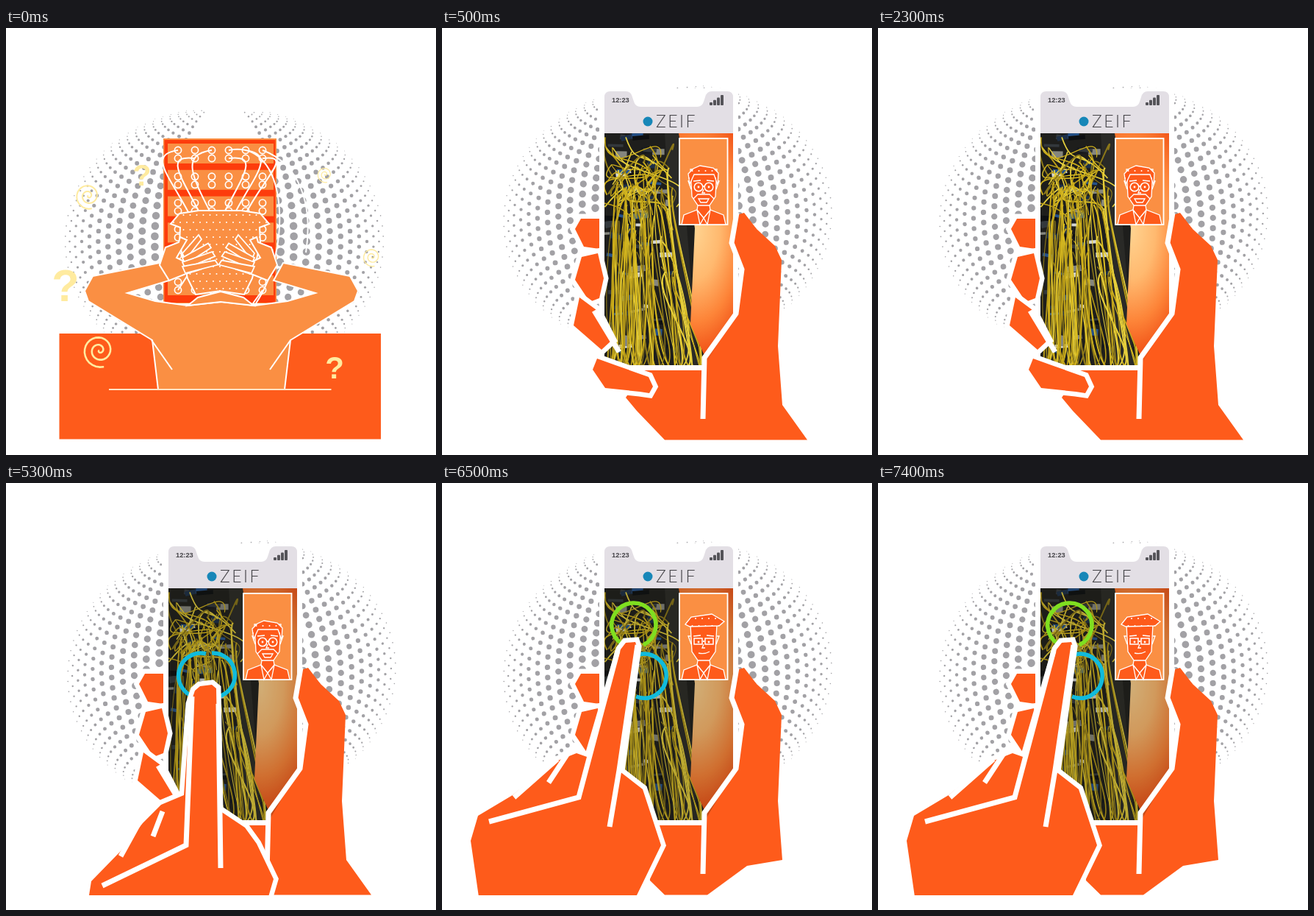
An HTML page for the animation above (8 s loop, 585 by 580 pixels).

```html
<!DOCTYPE html>
<html lang="en">
<head>
<meta charset="utf-8">
<title>Remote support</title>
<style>
  html, body { margin: 0; width: 100%; height: 100%; overflow: hidden; background: #fff }
  svg { display: block; width: 585px; height: 580px }
</style>
</head>
<body>
<svg id="stage" viewBox="0 0 585 580"></svg>
<script>
const ORANGE = '#fe5b1b', SKIN = '#fa8f43', RED = '#fd3c0c', CREAM = '#ffeb9f', CYAN = '#10bbdc', GREEN = '#7fdf20';
const LOOP = 8000, CUTS = [500, 3500, 6500];

const range = n => [...Array(n).keys()];
const repeat = (n, draw) => range(n).map(draw).join('');
const poly = (points, fill, width = 0, extra = '') =>
  `<polygon points="${points}" fill="${fill}" stroke="#fff" stroke-width="${width}" ${extra}/>`;
const line = (d, width, color = '#fff') =>
  `<path d="${d}" fill="none" stroke="${color}" stroke-width="${width}"/>`;
const rect = (x, y, w, h, fill, extra = '') =>
  `<rect x="${x}" y="${y}" width="${w}" height="${h}" fill="${fill}" ${extra}/>`;
const circle = (x, y, r, extra = '') => `<circle cx="${x}" cy="${y}" r="${r}" ${extra}/>`;
const scene = (ids, body) => `<g data-scenes="${ids}">${body}</g>`;
const limb = points => poly(points, ORANGE, 13, 'paint-order="stroke" clip-path="url(#floor)"');

// Mirror a drawing, or complete half an outline, about x = sum / 2.
const mirror = (body, sum) => body + `<g transform="matrix(-1 0 0 1 ${sum} 0)">${body}</g>`;
function symmetric(half, sum) {
  const points = half.split(' ').map(p => p.split(',').map(Number));
  return [...points, ...points.map(([x, y]) => [sum - x, y]).reverse()].join(' ');
}

let seed = 11;
const random = () => (seed = seed * 16807 % 2147483647) / 2147483647;
const between = (a, b) => a + (b - a) * random();
const pick = list => list[Math.floor(random() * list.length)];

// Staggered dots on a globe that shrink towards its edge.
function halftone(cx, cy, rx, ry, tilt) {
  let dots = '';
  for (let col = -15; col <= 15; col++)
    for (let row = -16; row <= 16; row++) {
      const lon = col * 5 * Math.PI / 180, lat = (row + col % 2 / 2) * 4.3 * Math.PI / 180;
      const r = 6.2 * Math.cos(lon) ** 1.5 * Math.cos(lat) ** 1.8;
      if (Math.abs(col) < 4 || r < .4) continue;
      const x = cx + rx * Math.cos(lat) * Math.sin(lon), y = cy + ry * Math.sin(lat);
      dots += circle(x.toFixed(1), y.toFixed(1), r.toFixed(2));
    }
  return `<g fill="#a2a1a5" transform="rotate(${tilt} ${cx} ${cy})">${dots}</g>`;
}

function spiral(cx, cy, size) {
  const points = range(61).map(i => {
    const k = i / 60, a = 1.3 + (1 - k) * 14.5, r = size * k;
    return `${(cx + r * Math.cos(a)).toFixed(1)} ${(cy + r * Math.sin(a)).toFixed(1)}`;
  });
  return line('M' + points.join('L'), size / 9, CREAM);
}

const question = (x, y, size) =>
  `<text x="${x}" y="${y}" font-size="${size}" text-anchor="middle" font-weight="700"
    font-family="Liberation Sans, sans-serif" fill="${CREAM}">?</text>`;

function switchPanel() {
  const sockets = (x, y) => circle(x, y, 4.6) + circle(x, y + 11, 4.6);
  return rect(214, 150, 154, 224, SKIN) + rect(215.5, 152, 151, 221, RED)
    + repeat(6, row => rect(220, 157 + row * 35.8, 144, 27, SKIN)
      + `<g fill="none" stroke="#fff" stroke-width="1.7">${repeat(6, col => sockets(234 + col * 23, 166 + row * 35.8))}</g>`);
}

// Wires leave the top sockets, bow outwards and vanish behind the head.
const wires = line(repeat(6, i => {
  const x = 234 + i * 23, side = i < 3 ? -1 : 1, end = 250 + i * 15;
  return `M${x} ${166 + i % 2 * 11}C${x + side * 42} 172 ${end + side * 28} 200 ${end} 254`;
}) + 'M349 166C400 185 418 240 408 305M303 166C385 150 390 300 340 374M349 356L336 374M234 356L247 336', 2);

function worriedPerson() {
  const body = symmetric('292,372 247,377 203,371 165,360 222,343 209,319 118,337 107,357 112,371 199,424 207,491', 586);
  const head = symmetric('292,248 262,248 236,252 224,266 237,271 236,292 247,340 258,362 292,357', 582);
  const finger = i => {
    const tipX = 266 + 13 * Math.sqrt(i), tipY = 284 + i * 11.5, y = 306 + i * 6;
    return poly(`240,${y} ${tipX - 4},${tipY - 3} ${tipX},${tipY + 3} 244,${y + 9}`, SKIN, 1.8);
  };
  const hand = poly('209,322 217,298 235,291 237,284 246,288 232,312 264,328 242,335 222,343', SKIN, 2) + repeat(4, finger);
  return poly(body, SKIN, 2) + poly(head, SKIN, 2) + poly(head, 'url(#hair)')
    + poly(symmetric('292,372 247,377 261,366 292,358', 584), SKIN, 2)
    + mirror(hand, 578)
    + mirror(line('M198 424L226 464', 2), 585);
}

// A rack overgrown with yellow patch cables: loose loops above, a falling bundle below.
function rackPhoto() {
  const parts = ['#0d0f12', '#17191d', '#33383c', '#24518a', '#1d2f48', '#d4d6d2', '#85867e'];
  const yellows = ['#d9bc22', '#b99c17', '#e6cf3c', '#8b7719', '#cdae1b'];
  const cable = (x, y, ex, ey, slack) => line(
    `M${x} ${y}C${x + between(-slack, slack)} ${y + slack} ${ex + between(-slack, slack)} ${ey - slack} ${ex} ${ey}`,
    between(1, 2.2), pick(yellows));
  return rect(221, 143, 140, 315, '#1e1e1c')
    + repeat(75, () => rect(between(218, 300), between(143, 440), between(6, 24), between(3, 10), pick(parts),
      `transform="rotate(${between(-15, 15)} 260 300)"`))
    + poly('303,143 323,143 348,458 322,458', '#2a2a27')
    + repeat(32, () => cable(between(216, 300), between(145, 240), between(216, 320), between(165, 290), 45))
    + repeat(75, () => {
      const k = random();
      return cable(235 + 80 * k, between(190, 340), 222 + 130 * k, 460, 24);
    });
}

function phone() {
  const text = (x, y, size, weight, font, spacing, content) =>
    `<text x="${x}" y="${y}" font-size="${size}" font-weight="${weight}" letter-spacing="${spacing}"
      font-family="${font}, sans-serif" fill="#454448">${content}</text>`;
  return rect(214, 82, 189, 383, '#fff')
    + '<path d="M221 143V94Q221 86 229 86H250Q257 86 259 94L261 100Q263 107 270 107H347Q354 107 356 100L358 94Q360 86 367 86H388Q396 86 396 94V143Z" fill="#e3dfe5"/>'
    + text(231, 101, 9.3, 700, 'Liberation Sans', 0, '12:23')
    + repeat(4, i => rect(364 + i * 5, 101 - i * 3.3, 4, 4 + i * 3.3, '#555459', 'rx="1"'))
    + circle(280, 127, 6.5, 'fill="#1787b8"') + text(291, 135, 23, 300, 'Lato', 2.5, 'ZEIF')
    + `<g clip-path="url(#screen)">${rackPhoto()}`
    + poly('322,143 396,143 396,458 354,458 357,445 338,402 344,272', 'url(#wall)') + '</g>'
    + scene('23', rect(221, 143, 175, 315, '#1c1a10', 'opacity=".2"'))
    + rect(323, 150, 65.5, 117, SKIN, 'stroke="#fff" stroke-width="1.8"');
}

function caller(hair, lens, mouth) {
  return poly(symmetric('326,267 329,254 347,247 356,258', 712), ORANGE, 1.3)
    + poly(symmetric('338,192 340,229 348,241 347,247 356,258', 712), ORANGE, 1.3)
    + mirror(line('M347 247L351 267L356 258M348 241H356M338 208H335L339 219M342 208L352 207M355 215H357', 1.3)
      + `<g fill="none" stroke="#fff" stroke-width="1.5">${lens}</g>` + circle(349, 216, 1.4, 'fill="#fff"'), 712)
    + line('M356 219L354 224H358' + mouth, 1.3)
    + poly(hair, ORANGE, 1.3) + poly(hair, 'url(#hair)');
}
const beardedMan = caller('337,212 335,198 342,191 351,187 369,190 376,197 375,213 370,199 343,199',
  circle(349, 216, 5.8), 'M342 232L348 226H364L370 232M349 232H363L360 237H352Z');
const youngCaller = caller('331,192 339,182 367,178 384,188 377,194 337,195',
  rect(343, 211, 11, 8, 'none'), 'M349 231Q357 233 364 229');

const fingersBehind = limb('189,259 214,259 214,300 193,297 181,273')
  + limb('190,311 212,306 220,340 214,367 201,372 181,342')
  + limb('187,366 210,383 231,424 217,437 179,404')
  + line('M207 384L241 440', 7);

const holdingHand = wrist =>
  poly(`275,465 354,465 399,388 408,328 394,292 401,254 411,251 428,273 453,296 462,315 457,432 463,512 ${wrist}`, ORANGE)
  + line('M401 251L394 292L408 328L400 388L357 448L355 531', 7);

const pointingLow = limb('113,560 116,541 155,501 186,462 211,437 242,424 251,300 257,282 264,276 280,274 286,279 289,444 325,468 341,490 364,538 357,562 113,562')
  + line('M131 547L245 492L253 290M292 523L289 300M156 507L183 458M200 480L213 446', 7);
const pointingHigh = limb('50,562 39,486 49,452 96,424 150,380 183,367 200,373 243,226 250,217 263,216 265,222 242,392 273,416 298,492 264,562')
  + line('M64 460L186 427L239 228M228 467L241 390L266 220M98 427L157 375M145 407L172 366', 7);

const defs = `<defs>
  <pattern id="hair" width="9" height="20" patternUnits="userSpaceOnUse" fill="#fff">
    ${circle(3, 4, 1)}${circle(7.5, 14, 1)}</pattern>
  <radialGradient id="wall" gradientUnits="userSpaceOnUse" cx="345" cy="275" r="165" gradientTransform="translate(172 0) scale(.5 1)">
    <stop offset="0" stop-color="#ffd390"/><stop offset=".4" stop-color="#ffb96f"/>
    <stop offset=".75" stop-color="#fd8438"/><stop offset="1" stop-color="#f2571a"/></radialGradient>
  <clipPath id="screen">${rect(221, 143, 175, 315, '#000')}</clipPath>
  <clipPath id="floor">${rect(0, 0, 585, 560, '#000')}</clipPath>
</defs>`;

const stage = document.getElementById('stage');
stage.innerHTML = defs
  + scene('0', halftone(297, 290, 224, 188, 0)
    + switchPanel() + wires
    + rect(72.5, 415, 437.5, 143.5, ORANGE) + worriedPerson()
    + line('M140 491H442.5', 2, '#ffe3c4')
    + spiral(127, 438, 23) + spiral(112, 228, 18) + spiral(434, 199, 11) + spiral(498, 311, 13)
    + question(81, 371, 61) + question(185, 214, 41) + question(447, 476, 42))
  + scene('123', halftone(307, 257, 231, 186, -5) + phone())
  + scene('12', beardedMan)
  + scene('3', youngCaller)
  + scene('123', fingersBehind)
  + scene('12', holdingHand('497,559.5 303,559.5 265,520 250,502'))
  + scene('3', holdingHand('415,520 361,559.5 303,559.5 283,540'))
  + scene('1', limb('211,449 236,458 281,474 287,487 282,496 269,494 222,489 205,464'))
  + scene('2', line('M258 291A30 30 0 0 1 272 232M280 231A30 30 0 0 1 289 290', 5.5, CYAN) + pointingLow)
  + scene('3', line('M268 233A30 30 0 1 1 264 290', 5.5, CYAN)
    + line('M274 220A30 30 0 1 0 250 221', 5.5, GREEN) + pointingHigh);

const groups = [...stage.querySelectorAll('[data-scenes]')];
function render() {
  const time = performance.now() % LOOP;
  const current = CUTS.filter(cut => time >= cut).length;
  for (const group of groups)
    group.style.display = group.dataset.scenes.includes(current) ? '' : 'none';
  requestAnimationFrame(render);
}
render();
</script>
</body>
</html>
```
